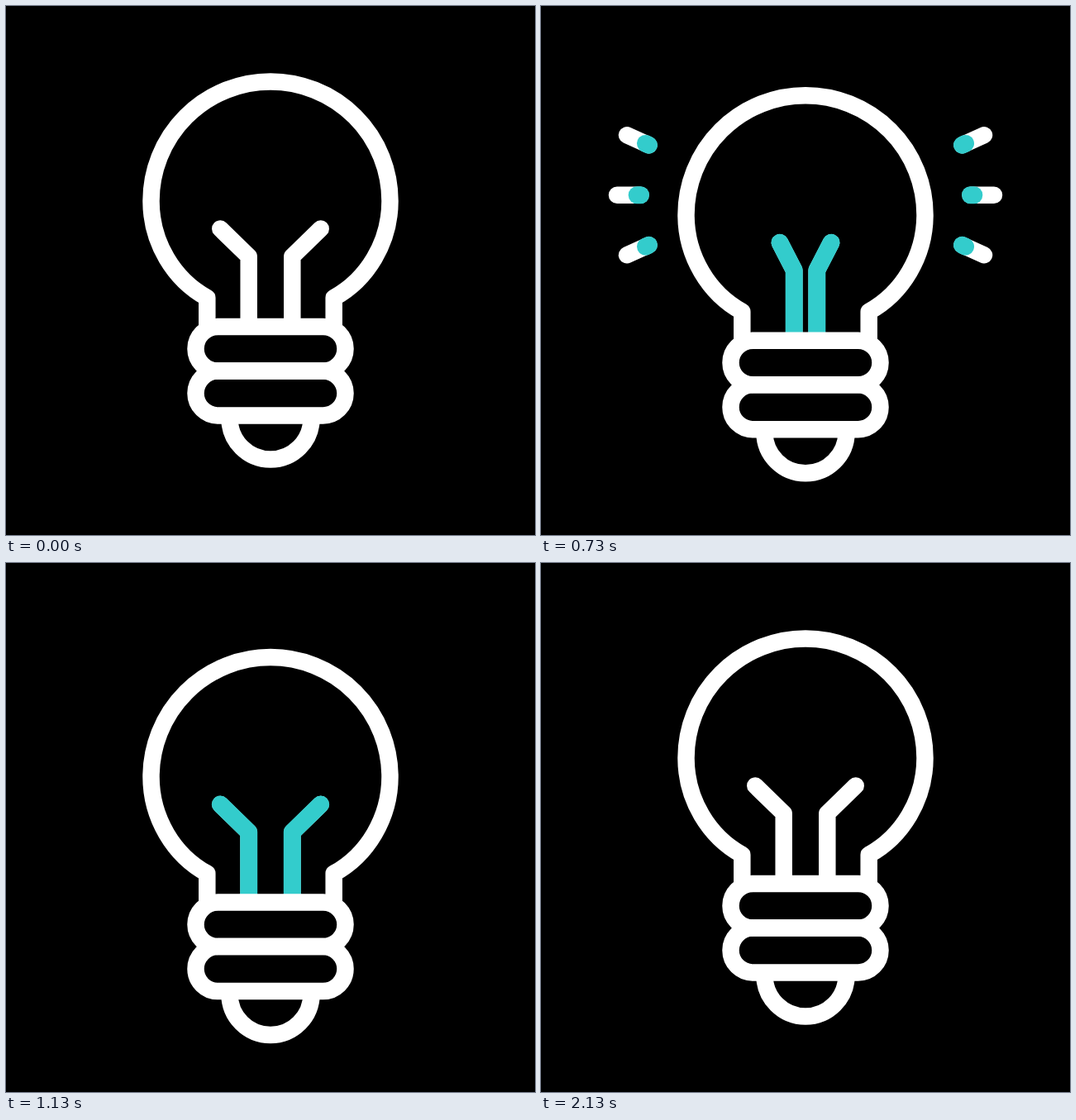
An HTML page that plays this animation: 640 by 640 pixels, repeating every 2.5 s.

```html
<!DOCTYPE html>
<html lang="en">
<head>
<meta charset="utf-8">
<title>Light bulb</title>
<style>
  html, body { margin: 0; width: 100%; height: 100%; overflow: hidden; background: #000; }
  svg { display: block; width: 100%; height: 100%; }
  path, rect { fill: none; stroke: #fff; stroke-width: 20.5; stroke-linecap: round; stroke-linejoin: round; }
  .teal { stroke: #3cc; stroke-width: 21; }
</style>
</head>
<body>
<svg viewBox="0 0 640 640">
  <g id="lamp">
    <g id="moving"></g>
    <path d="M243.3 386V353C203 331 175.5 286 175.5 236A144.5 144.5 0 0 1 464.5 236C464.5 286 437 331 396.7 353V386"/>
    <rect x="229.5" y="388" width="181" height="53.5" rx="26.75"/>
    <rect x="229.5" y="441.5" width="181" height="54" rx="27"/>
    <path d="M270.5 499A49.5 49.5 0 0 0 369.5 499"/>
  </g>
</svg>
<script>
const LOOP = 2500, FPS = 30;
const lamp = document.getElementById('lamp');
const moving = document.getElementById('moving');

// Inner and outer end of each left ray; the right side is mirrored.
const RAYS = [
  [130.5, 151.5, 104, 139.5],
  [120.5, 212, 92, 212],
  [130.5, 272.5, 104, 284.5]
];

const mix = (a, b, k) => a + (b - a) * k;
const clamp = x => Math.min(1, Math.max(0, x));
const ramp = (n, from, to) => {
  const x = clamp((n - from) / (to - from));
  return x * x * (3 - 2 * x);
};
const hop = (n, start, peak, end) => ramp(n, start, peak) - ramp(n, peak, end);

// Nearly linear, with short soft ends.
function glide(n, from, to) {
  const x = clamp((n - from) / (to - from));
  return mix(x, x * x * (3 - 2 * x), 0.5);
}

function addPath(teal) {
  const el = document.createElementNS('http://www.w3.org/2000/svg', 'path');
  if (teal) el.setAttribute('class', 'teal');
  moving.append(el);
  return el;
}

const show = (el, on) => el.setAttribute('visibility', on ? 'visible' : 'hidden');

const sides = [-1, 1];
const wires = sides.map(side => ({ side, white: addPath(false), teal: addPath(true) }));
wires.forEach(w => w.teal.setAttribute('pathLength', 1));
const rays = sides.flatMap(side => RAYS.map(ends => (
  { side, ends, white: addPath(false), teal: addPath(true) }
)));

function drawWires(n) {
  const squeeze = hop(n, 10, 20, 26);
  const lit = glide(n, 10, 20) - glide(n, 52, 64);
  const stem = mix(26.3, 9.4, squeeze);
  const tip = mix(60.7, 20.7, squeeze);
  for (const { side, white, teal } of wires) {
    const d = `M${320 + side * stem} 386V303L${320 + side * tip} 269.5`;
    white.setAttribute('d', d);
    teal.setAttribute('d', d);
    teal.setAttribute('stroke-dasharray', `${lit} 2`);
    show(teal, lit > 0);
  }
}

function drawRay(el, { side, ends: [x0, y0, x1, y1] }, from, to) {
  const point = k => `${320 + side * (320 - mix(x0, x1, k))} ${mix(y0, y1, k)}`;
  show(el, to > from);
  el.setAttribute('d', `M${point(from)}L${point(to)}`);
}

function draw(n) {
  const drop = 22.6 * (hop(n, 11.7, 20, 26) + hop(n, 26, 34, 39));
  lamp.setAttribute('transform', `translate(0 ${drop})`);
  drawWires(n);
  const gone = glide(n, 25, 30);
  for (const ray of rays) {
    drawRay(ray.white, ray, gone, glide(n, 15, 20));
    drawRay(ray.teal, ray, gone, glide(n, 21, 26));
  }
}

const start = performance.now();
function tick() {
  const t = (performance.now() - start) % LOOP;
  draw(Math.floor((t + 4) * FPS / 1000) % (LOOP * FPS / 1000));
  requestAnimationFrame(tick);
}
tick();
</script>
</body>
</html>
```
